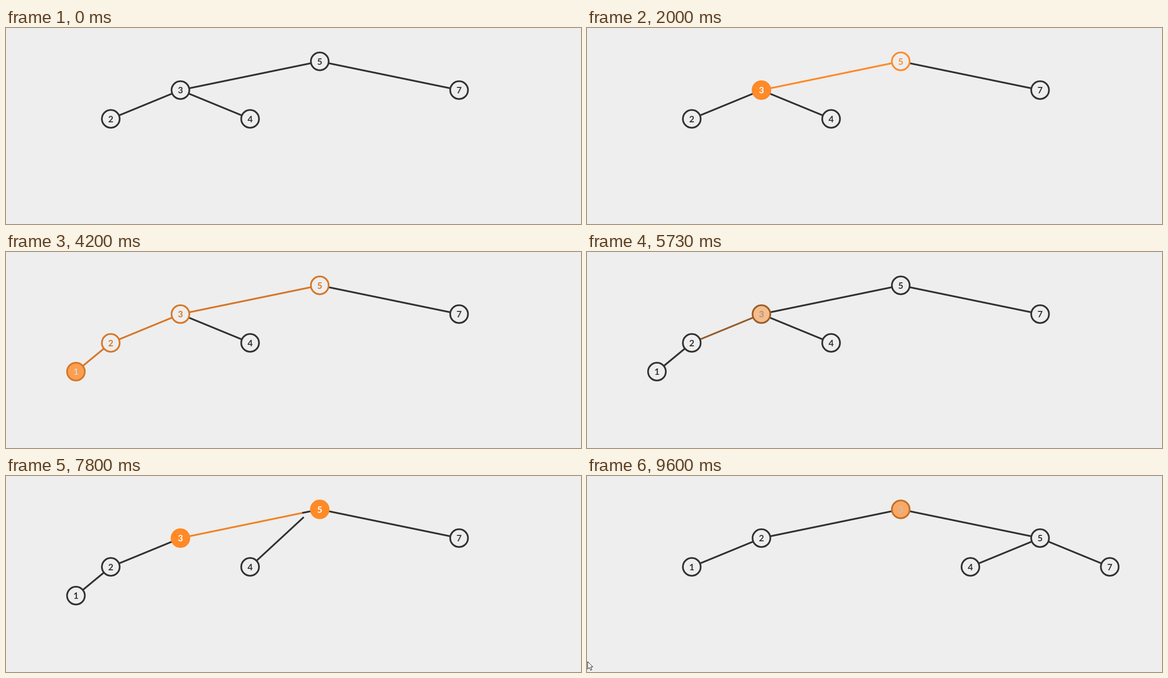
Write an HTML page with a canvas that moves like this. It is 1248 by 426 pixels and loops after 9670 ms.

```html
<!DOCTYPE html>
<html lang="en">
<head>
<meta charset="utf-8">
<title>Balanced tree insertion</title>
<style>
  html, body { margin: 0; width: 100%; height: 100%; overflow: hidden; background: #eee; }
  canvas { display: block; }
</style>
</head>
<body>
<canvas id="stage" width="1248" height="426"></canvas>
<script>
const ctx = document.getElementById('stage').getContext('2d');

const LOOP = 9670, FIRST = 600, STEP = 488.6;
const GROW_DELAY = 10, GROW_TIME = 430;
const PAPER = [238, 238, 238], INK = [51, 51, 51], ORANGE = [255, 138, 39], WHITE = [255, 255, 255];
const KEYS = [1, 2, 3, 4, 5, 7];

// Positions as [column, row] around the root
const leaning = { 5: [0, 0], 3: [-4, 1], 7: [4, 1], 2: [-6, 2], 4: [-2, 2], 1: [-7, 3] };
const balanced = { 3: [0, 0], 2: [-4, 1], 5: [4, 1], 1: [-6, 2], 4: [2, 2], 7: [6, 2] };

// Parent of each key
const start = { 3: 5, 7: 5, 2: 3, 4: 3 };
const inserted = { ...start, 1: 2 };
const rotated = { 2: 3, 5: 3, 1: 2, 4: 5, 7: 5 };

const state = (parents, places, marks = {}) =>
  ({ parents, places, hot: [], traced: [], lit: [], ...marks });

const states = [
  // search for the insertion point
  state(start, leaning),
  state(start, leaning, { hot: [5] }),
  state(start, leaning, { traced: [5], lit: [3], grow: 3 }),
  state(start, leaning, { traced: [5], hot: [3], lit: [3] }),
  state(start, leaning, { traced: [5, 3], lit: [3, 2], grow: 2 }),
  state(start, leaning, { traced: [5, 3], hot: [2], lit: [3, 2] }),
  state(inserted, leaning, { traced: [5, 3, 2], lit: [3, 2, 1], grow: 1 }),
  state(inserted, leaning, { traced: [5, 3, 2], hot: [1], lit: [3, 2, 1] }),
  state(inserted, leaning),
  // check the balance upwards
  state(inserted, leaning, { hot: [2] }),
  state(inserted, leaning, { lit: [2] }),
  state(inserted, leaning, { hot: [3] }),
  state(inserted, leaning, { lit: [3] }),
  state(inserted, leaning, { hot: [5] }),
  state(inserted, leaning, { hot: [5, 3] }),
  // rotate and lay out again
  state(rotated, leaning, { hot: [5, 3], lit: [5] }),
  state(rotated, balanced, { hot: [5, 3], lit: [5] }),
  state(rotated, balanced, { lit: [5] }),
  state(rotated, balanced, { hot: [3] }),
  state(rotated, balanced)
];
const BIRTH = 7; // state in which node 1 appears

const clamp = v => Math.min(1, Math.max(0, v));
const ease = t => t < 0.5 ? 4 * t ** 3 : 1 - 4 * (1 - t) ** 3;
const mix = (a, b, p) => a.map((v, i) => v + (b[i] - v) * p);
const css = c => `rgb(${c.map(Math.round).join()})`;

const place = (s, key) => [681 + 75.6 * s.places[key][0], 72.5 + 62.5 * s.places[key][1]];

// Edge from rim to rim, or null when the key has no parent
function edgePath(s, key) {
  if (!s.parents[key]) return null;
  const a = place(s, s.parents[key]), b = place(s, key);
  const trim = 20 / Math.hypot(b[0] - a[0], b[1] - a[1]);
  return [mix(a, b, trim), mix(b, a, trim)];
}

function line([a, b], color, width) {
  ctx.strokeStyle = css(color);
  ctx.lineWidth = width;
  ctx.beginPath();
  ctx.moveTo(...a);
  ctx.lineTo(...b);
  ctx.stroke();
}

const edgeColor = (s, key) => s.lit.includes(key) ? ORANGE : INK;

function drawEdge(from, to, key, p, grown) {
  const before = edgePath(from, key), after = edgePath(to, key);
  if (!before && !after) return;
  if (to.grow === key) {
    if (grown === 1) return line(after, ORANGE, 3.8);
    if (before) line(before, INK, 3.8);
    const reach = ease(grown);
    if (reach > 0) line([after[0], mix(...after, reach)], ORANGE, 12);
    return;
  }
  const a = before || [after[0], after[0]], b = after || [before[0], before[0]];
  line([mix(a[0], b[0], p), mix(a[1], b[1], p)],
    mix(edgeColor(from, key), edgeColor(to, key), p), 3.8);
}

function nodeColors(s, key) {
  if (s.hot.includes(key)) return [ORANGE, ORANGE, WHITE];
  if (s.traced.includes(key)) return [PAPER, ORANGE, ORANGE];
  return [PAPER, INK, INK];
}

function drawNode(from, to, key, p, size) {
  const [x, y] = mix(place(from, key), place(to, key), p);
  const old = nodeColors(from, key);
  const [fill, ring, text] = nodeColors(to, key).map((c, i) => css(mix(old[i], c, p)));
  ctx.beginPath();
  ctx.arc(x, y, 19.3 * size, 0, 2 * Math.PI);
  ctx.fillStyle = fill;
  ctx.fill();
  ctx.strokeStyle = ring;
  ctx.lineWidth = 3.7 * size;
  if (size > 0) ctx.stroke();
  ctx.fillStyle = text;
  ctx.fillText(key, x, y + 7);
}

function drawPointer(x, y) {
  const outline = [[0, 0], [0, 16], [3.6, 12.6], [6.4, 18.6], [9, 17.6], [6.4, 11.5], [11.3, 11.5]];
  ctx.beginPath();
  for (const [dx, dy] of outline) ctx.lineTo(x + dx, y + dy);
  ctx.closePath();
  ctx.fillStyle = '#fff';
  ctx.fill();
  ctx.strokeStyle = '#000';
  ctx.lineWidth = 1;
  ctx.stroke();
}

function draw(time) {
  const index = Math.min(states.length - 1, Math.max(1, Math.floor((time - FIRST) / STEP) + 1));
  const from = states[index - 1], to = states[index];
  const elapsed = time - FIRST - (index - 1) * STEP;
  const p = ease(clamp(elapsed / STEP));
  const grown = clamp((elapsed - GROW_DELAY) / GROW_TIME);

  ctx.fillStyle = css(PAPER);
  ctx.fillRect(0, 0, 1248, 426);
  for (const key of KEYS) drawEdge(from, to, key, p, grown);

  ctx.font = '700 19.5px Lato, "Open Sans", sans-serif';
  ctx.textAlign = 'center';
  for (const key of KEYS) {
    if (key === 1 && index < BIRTH) continue;
    drawNode(from, to, key, p, key === 1 && index === BIRTH ? p : 1);
  }
  if (time >= 9300) drawPointer(1.5, time < 9460 ? 405.5 : 403.5);
}

const origin = performance.now();
function tick() {
  draw((performance.now() - origin) % LOOP);
  requestAnimationFrame(tick);
}
tick();
</script>
</body>
</html>
```
